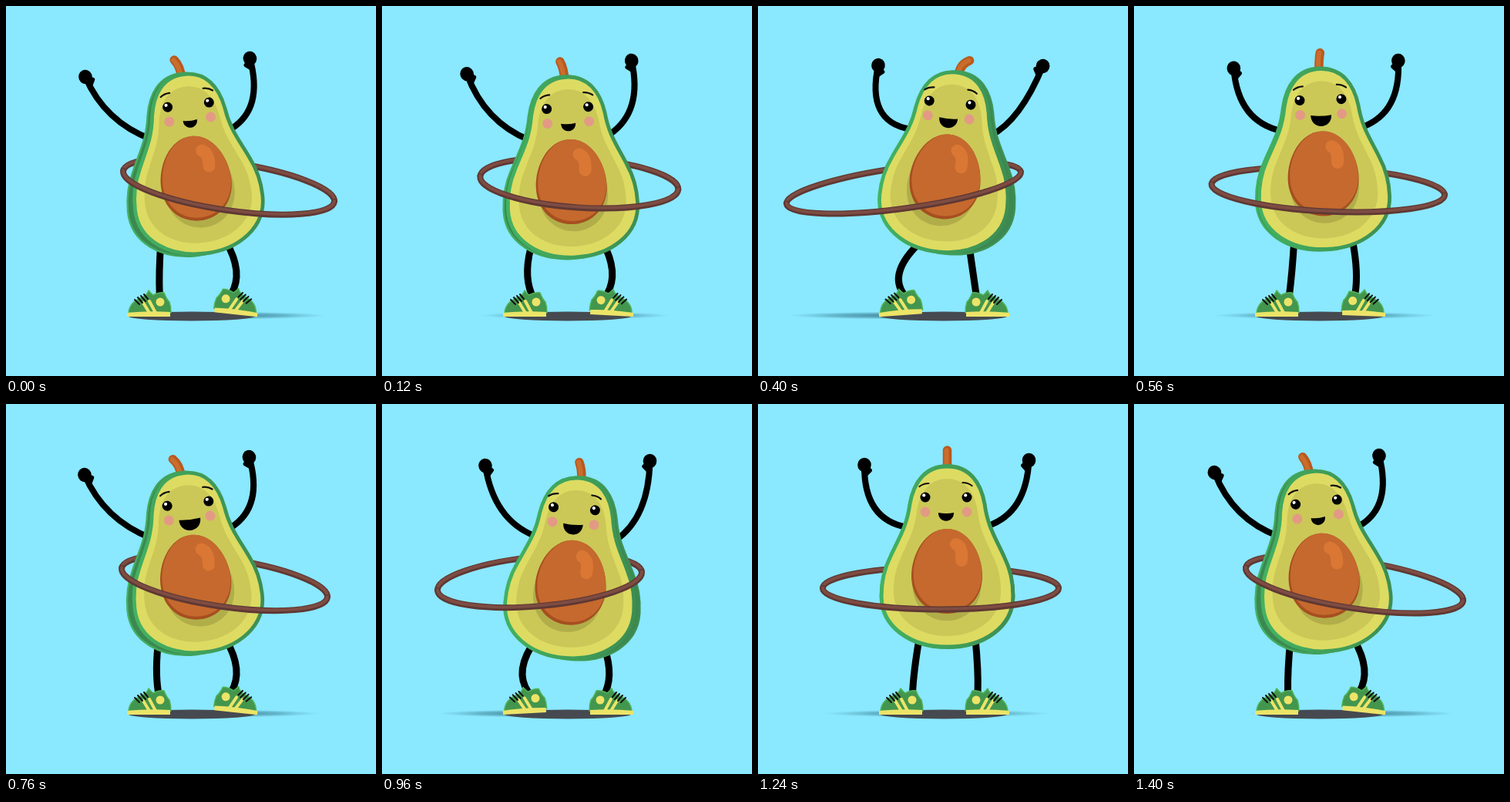
An HTML page with a canvas that plays this animation: 480 by 480 pixels, repeating every 1440 ms.

```html
<!DOCTYPE html>
<html lang="en">
<head>
<meta charset="utf-8">
<title>Hula hoop avocado</title>
<style>
html, body { margin: 0; height: 100%; overflow: hidden; background: #8ae8ff; }
canvas { display: block; }
</style>
</head>
<body>
<canvas width="480" height="480"></canvas>
<script>
const ctx = document.querySelector('canvas').getContext('2d');
const LOOP = 1440, SWING = LOOP / 2, STEP = 40;

// Key poses of one swing; every track has a value for each time
const TIMES = [0, 40, 240, 340, 400, 520, 680];
const TRACKS = {
  hoopLeft: [152, 150, 72, 30, 37, 84, 145],
  hoopRight: [426, 417, 337, 335, 341, 390, 427],
  hoopY: [234, 232, 230, 234, 236, 239, 234],
  hoopTilt: [8.3, 8.1, -5.2, -8, -7.8, 0, 8.7],
  hoopDepth: [31, 31, 32, 28, 26.5, 27.5, 31],
  bodyX: [258, 257.5, 238, 232.5, 234, 245.5, 258],
  bodyY: [324, 325, 332.5, 327, 322, 318, 323],
  bodyTilt: [-6.5, -6.5, 4.3, 6, 5.5, 0, -6.5],
  handX: [103, 102, 134, 151, 156, 138, 104.5],
  handLY: [92, 92, 80, 77, 77, 79, 89],
  handRY: [68, 69, 74, 77, 78, 73, 67],
  elbowL: [128, 127, 145, 143, 140, 137, 128],
  elbowR: [334, 334, 346, 342, 340, 348, 335],
  hipL: [201, 198, 200, 210, 212, 209, 203],
  kneeL: [198, 193, 170, 167, 168, 202, 199],
  hipR: [285, 285, 284, 277, 273, 282, 285],
  kneeR: [309, 309, 302, 288, 279, 286, 309],
};

// Smooth periodic curve through the given points
function spline(times, values, period, t) {
  const n = times.length;
  const time = i => times[(i + n) % n] + Math.floor(i / n) * period;
  const value = i => values[(i + n) % n];
  const slope = i => (value(i + 1) - value(i)) / (time(i + 1) - time(i));
  const tangent = i => {
    const before = time(i) - time(i - 1), after = time(i + 1) - time(i);
    return (after * slope(i - 1) + before * slope(i)) / (before + after);
  };
  let i = n - 1;
  while (times[i] > t) i--;
  const h = time(i + 1) - time(i), u = (t - time(i)) / h, v = 1 - u;
  return v * v * ((1 + 2 * u) * value(i) + u * h * tangent(i)) +
         u * u * ((1 + 2 * v) * value(i + 1) - v * h * tangent(i + 1));
}

const BODY = new Path2D('M0-240C30-240 45-218 50-190C54-160 64-146 76-120C84-104 88-88 88-68' +
  'C88-26 48 0 0 0C-48 0-88-26-88-68C-88-88-84-104-76-120C-64-146-54-160-50-190C-45-218-30-240 0-240Z');
const PIT = new Path2D('M0-55C28-55 46-22 46 6C46 36 25 55 0 55C-25 55-46 36-46 6C-46-22-28-55 0-55Z');
const SHINE = new Path2D('M12-35Q21-31 19-14');
const BROWS = new Path2D('M-36-211Q-31-215-24-215M20-216Q27-216 32-212');
const SHOE = new Path2D('M0-4C1-13 6-20 18-24Q24-27 26-33Q29-29 32-27Q40-31 46-30Q49-22 53-18Q55-12 55-4Z');
const SOLE = new Path2D('M-2-4Q26-7 54-5L54 1L-2 1Z');
const STRIPES = new Path2D('M19-17L27-4M27-19L35-4');
const LACES = new Path2D('M8-21L14-15M12-24L18-17M16-26L22-19M20-28L25-22');

const rad = degrees => degrees * Math.PI / 180;

function fill(color, path) {
  ctx.fillStyle = color;
  ctx.fill(path);
}

function stroke(color, width, path) {
  ctx.strokeStyle = color;
  ctx.lineWidth = width;
  ctx.stroke(path);
}

function oval(color, x, y, rx, ry = rx) {
  const path = new Path2D();
  path.ellipse(x, y, rx, ry, 0, 0, 7);
  fill(color, path);
}

function at(x, y, draw, angle = 0, sx = 1, sy = sx) {
  ctx.save();
  ctx.translate(x, y);
  ctx.rotate(angle);
  ctx.scale(sx, sy);
  draw();
  ctx.restore();
}

function limb(x0, y0, cx, cy, x1, y1, width) {
  stroke('#000', width, new Path2D(`M${x0} ${y0}Q${cx} ${cy} ${x1} ${y1}`));
}

function hoop(p, start) {
  const angle = rad(p.hoopTilt), half = (p.hoopRight - p.hoopLeft) / 2;
  const rx = Math.sqrt(half ** 2 - (p.hoopDepth * Math.sin(angle)) ** 2) / Math.cos(angle);
  const arc = new Path2D();
  arc.ellipse(p.hoopLeft + half, p.hoopY, rx, p.hoopDepth, angle, start, start + Math.PI);
  stroke('#5f3833', 8, arc);
  at(0, -.8, () => stroke('#7d4c42', 4, arc));
}

function shadows(p) {
  const half = (p.hoopRight - p.hoopLeft) * .48;
  at((p.hoopLeft + p.hoopRight) / 2 - 5, 401.5, () => {
    const shade = ctx.createRadialGradient(0, 0, 0, 0, 0, 1);
    shade.addColorStop(0, 'rgba(50,110,130,.85)');
    shade.addColorStop(.6, 'rgba(60,130,150,.5)');
    shade.addColorStop(1, 'rgba(80,160,180,0)');
    oval(shade, 0, 0, 1);
  }, 0, half, 5);
  oval('#464a50', 241, 402.5, 82, 6);
}

function shoe(x, side, lift) {
  at(x, 402, () => {
    fill('#43964d', SHOE);
    stroke('#4fb45b', 1.5, SHOE);
    fill('#ece468', SOLE);
    stroke('#ece468', 4, STRIPES);
    oval('#ece468', 41, -18, 5.5);
    stroke('#111', 2, LACES);
  }, rad(lift), side, 1);
}

function arm(shoulderX, shoulderY, elbowX, elbowY, handX, handY, side) {
  limb(shoulderX, shoulderY, elbowX, elbowY, handX, handY, 8);
  at(handX, handY, () => {
    oval('#000', 0, 0, 8.8, 9.3);
    stroke('#000', 6, new Path2D('M1 13L7 7'));
  }, Math.atan2(elbowY - handY, elbowX - handX) - Math.PI / 2, side, 1);
}

function stem(turn, bend) {
  const x = turn * 4, a = rad(bend);
  const path = new Path2D(`M${x} -234Q${x} -248 ${x + 20 * Math.sin(a)} ${-239 - 19 * Math.cos(a)}`);
  stroke('#b9591f', 11.5, path);
  at(-1, 0, () => stroke('#c96d2c', 6, path));
}

function face(mouth) {
  for (const x of [-28.5, 25.5]) {
    oval('#e39a84', x, -178, 6.5);
    oval('#000', x, -197, 6.5);
    oval('#fff', x - 1.8, -199.6, 2.1);
  }
  stroke('#111', 2.2, BROWS);
  const drop = mouth * 1.42;
  fill('#000', new Path2D(`M${-1.5 - mouth} -177Q-1.5 -175 ${mouth - 1.5} -177` +
    `C${mouth - 1.5} ${drop - 177} ${-1.5 - mouth} ${drop - 177} ${-1.5 - mouth} -177Z`));
}

function body(turn, bend, mouth) {
  stem(turn, bend);
  const rim = ctx.createLinearGradient(-88, 0, 88, 0);
  rim.addColorStop(0, '#42b262');
  rim.addColorStop(1, '#3d8e52');
  const narrow = 1 - .025 * Math.abs(turn);

  // Skin seen beside the cut surface
  ctx.save();
  ctx.transform(narrow * .985, 0, .025 * turn, .99, turn * 10, -1.2);
  fill('#3c8850', BODY);
  stroke(rim, 2.5, BODY);
  ctx.restore();

  at(0, -3, () => {
    fill('#dddb62', BODY);
    stroke(rim, 5, BODY);
  }, 0, .97 * narrow, .975);
  at(0, -17, () => fill('#cbc858', BODY), 0, .79, .85);

  at(-.5 - turn * 4, -90, () => fill('#b1ae4a', PIT), 0, .97);
  at(-.5, -101, () => {
    fill('#a64f20', PIT);
    at(1, -2, () => fill('#c5692e', PIT), 0, .965);
    stroke('#da7734', 16, SHINE);
  });
  at(-turn * 2.3, 0, () => face(mouth));
}

function draw(t) {
  const p = {};
  for (const name in TRACKS) p[name] = spline(TIMES, TRACKS[name], SWING, t % SWING);
  const turn = Math.max(-1, Math.min(1, p.bodyTilt / 5.5));
  const tilt = rad(p.bodyTilt), sin = Math.sin(tilt), cos = Math.cos(tilt);
  const onBody = (x, y) => [p.bodyX + x * cos - y * sin, p.bodyY + x * sin + y * cos];
  const bend = spline([0, 240, 400, 560, 760, 960, 1120, 1240, 1400],
    [-20, 5, 38, 6, -24, -13, 8, 0, -18], LOOP, t);
  const mouth = 11.6 - 2.4 * Math.cos(2 * Math.PI * t / LOOP);

  ctx.fillStyle = '#8ae8ff';
  ctx.fillRect(0, 0, 480, 480);
  ctx.lineCap = 'butt';
  shadows(p);
  hoop(p, Math.PI);

  ctx.lineCap = ctx.lineJoin = 'round';
  limb(p.hipL, 305, p.kneeL, 346, 190 + (p.kneeL - 170) * .33, 374, 9);
  limb(p.hipR, 305, p.kneeR, 346, 283 + (p.kneeR - 279) * .3, 374, 9);
  shoe(159, 1, -4 * Math.max(turn, 0));
  shoe(324, -1, 6 * Math.max(-turn, 0));
  arm(...onBody(-52, -158), p.elbowL, 150, p.handX, p.handLY, 1);
  arm(...onBody(53, -160), p.elbowR, 141 + 8 * turn, p.handX + 213.5, p.handRY, -1);
  at(p.bodyX, p.bodyY, () => body(turn, bend, mouth), tilt);
  hoop(p, 0);
}

const start = performance.now();
function tick() {
  const t = (performance.now() - start) % LOOP;
  draw(Math.floor(t / STEP) * STEP);
  requestAnimationFrame(tick);
}
tick();
</script>
</body>
</html>
```
